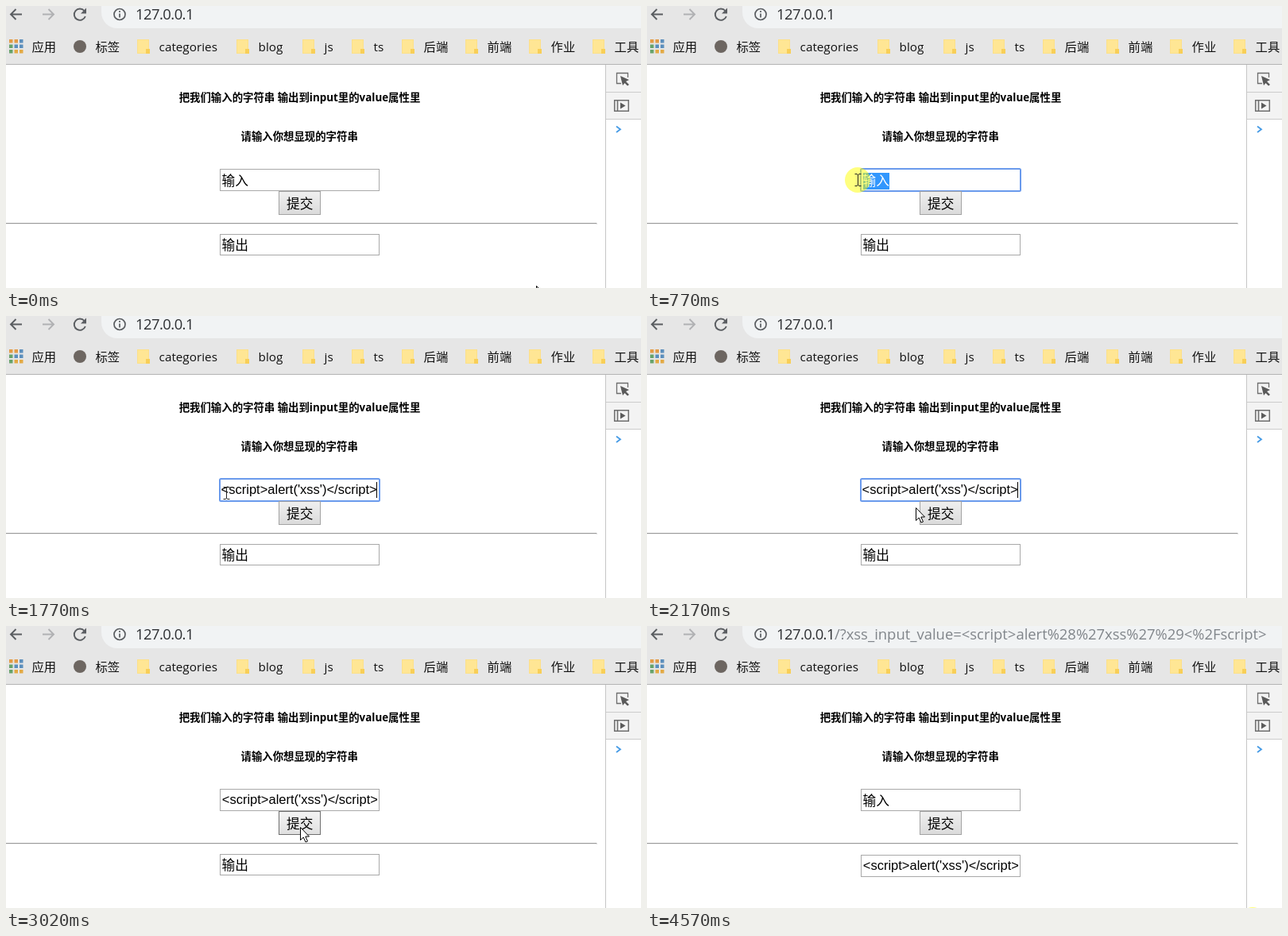
Animation of 799x355 px, one loop 4.66 s. Source, as an HTML page with a canvas:

```html
<!DOCTYPE html>
<html lang="zh-CN">
<head>
<meta charset="utf-8">
<style>
html, body { margin: 0; width: 100%; height: 100%; overflow: hidden; background: #fff; }
canvas { display: block; }
</style>
</head>
<body>
<canvas id="stage" width="799" height="355"></canvas>
<script>
const ctx = document.getElementById('stage').getContext('2d');
const LOOP = 4660, TICK = LOOP / 60;
const CJK = '"Noto Sans CJK SC", "Noto Sans CJK", sans-serif';
const UI = '"Open Sans", ' + CJK;
const FIELD = '"Liberation Sans", ' + CJK;
const PAYLOAD = "<script>alert('xss')<\/script>";
const QUERY = '/?xss_input_value=<script>alert%28%27xss%27%29<%2Fscript>';

// Pointer path: [tick, x, y]
const PATH = [
  [0, 667, 352], [7, 335, 222], [8, 318, 221], [9, 285, 220], [10, 265, 219],
  [12, 259, 220], [13, 260, 221], [21, 260, 221], [24, 286, 224], [28, 338, 241],
  [31, 379, 255], [32, 387, 255], [35, 387, 255], [39, 370, 253], [40, 373, 253],
  [47, 373, 253], [48, 373, 254], [53, 752, 351], [54, 752, 351], [55, 762, 370], [60, 762, 370]
];

const between = (v, a, b) => v >= a && v <= b;

function pointerAt(tick) {
  const i = Math.max(1, PATH.findIndex(p => p[0] >= tick));
  const [t0, x0, y0] = PATH[i - 1], [t1, x1, y1] = PATH[i];
  const k = (tick - t0) / (t1 - t0);
  return { x: Math.round(x0 + (x1 - x0) * k), y: Math.round(y0 + (y1 - y0) * k) };
}

function rect(x, y, w, h, fill) {
  ctx.fillStyle = fill;
  ctx.fillRect(x, y, w, h);
}

function frame(x, y, w, h, color) {
  ctx.strokeStyle = color;
  ctx.lineWidth = 1;
  ctx.strokeRect(x + .5, y + .5, w - 1, h - 1);
}

function text(str, x, y, size, family, color = '#000', weight = 400, spacing = 0) {
  ctx.font = `${weight} ${size}px ${family}`;
  ctx.letterSpacing = spacing + 'px';
  ctx.fillStyle = color;
  ctx.fillText(str, x, y);
  ctx.letterSpacing = '0px';
}

function line(d, color, width, x = 0, y = 0) {
  ctx.save();
  ctx.translate(x, y);
  ctx.strokeStyle = color;
  ctx.lineWidth = width;
  ctx.stroke(new Path2D(d));
  ctx.restore();
}

function shape(d, color, x = 0, y = 0) {
  ctx.save();
  ctx.translate(x, y);
  ctx.fillStyle = color;
  ctx.fill(new Path2D(d));
  ctx.restore();
}

function disc(x, y, r, color) {
  ctx.fillStyle = color;
  ctx.beginPath();
  ctx.arc(x, y, r, 0, Math.PI * 2);
  ctx.fill();
}

function folder(x) {
  rect(x, 42, 15, 18, '#ffe694');
  frame(x, 42, 15, 18, '#fde08a');
  shape('M11 12h5v6h-5z', '#f8cf58', x, 42);
}

function browserBar(submitted) {
  rect(0, 0, 799, 73, '#e6e6e6');
  shape('M799 0H120V8a20 20 0 0 0 20 20H799z', '#f1f3f4');
  rect(0, 73, 799, 1, '#b4b4b4');

  const back = 'M20 10.5H6M12.5 4L6 10.5L12.5 17';
  line(back, '#5a5d61', 1.9);
  ctx.save();
  ctx.scale(-1, 1);
  line(back, '#b0b1b3', 1.9, -66, 0);
  ctx.restore();
  line('M98.5 6A7.2 7.2 0 1 0 99.8 13', '#5a5d61', 1.9);
  shape('M101 2.5v7h-7z', '#5a5d61');

  line('M150 10.5a7 7 0 1 1-14 0a7 7 0 1 1 14 0M143 9.5v5M143 6v2', '#5a5d61', 1.7);
  text('127.0.0.1', 163, 17, 18.43, UI, '#2d2f32', 400, -.55);
  if (submitted) text(QUERY, 236, 17, 18.43, UI, '#80858a');

  const dots = ['#e39b45', '#e39b45', '#5c8fbd', '#68a36b', '#5c8fbd', '#5c8fbd', '#68a36b', '#e3aa45', '#e3aa45'];
  dots.forEach((c, i) => rect(4 + i % 3 * 6.5, 42 + Math.floor(i / 3) * 6.5, 4.5, 4.5, c));
  disc(93, 51, 8, '#6d6661');

  const label = (str, x) => text(str, x, 57, 15.3, UI, '#111');
  label('应用', 32.5);
  label('标签', 112.5);
  [['categories', 165], ['blog', 290], ['js', 373], ['ts', 435],
   ['后端', 498], ['前端', 578], ['作业', 658], ['工具', 738]].forEach(([name, x]) => {
    folder(x);
    label(name, x + 27.6);
  });
}

function devtools() {
  rect(754, 74, 45, 281, '#fff');
  rect(755, 74, 44, 68, '#f3f3f3');
  rect(754, 74, 1, 281, '#c6c6c6');
  rect(755, 108, 44, 1, '#ccc');
  rect(755, 142, 44, 1, '#ccc');
  line('M774 97.5H768.5V84.5H782.5V90', '#6e6e6e', 1.3);
  shape('M773 88L784 93L780 95L784 99L782 100.5L778.5 97L776 100z', '#5a5a5a');
  line('M765.7 118.7H783.3V132.3H765.7zM769.5 118V132', '#6e6e6e', 1.5);
  shape('M773 121.5V129.5L779.5 125.5z', '#5a5a5a');
  line('M768 151.5L773 155.2L768 159', '#469be6', 1.8);
}

function inputText(value, y, shift = 0) {
  if (value === PAYLOAD) text(value, 271.8 - shift, y + 19, 16.5, FIELD);
  else text(value, 271.5, y + 21, 16.67, CJK);
}

function clipped(y, draw) {
  ctx.save();
  ctx.beginPath();
  ctx.rect(270, y + 1, 199, 26);
  ctx.clip();
  draw();
  ctx.restore();
}

function firstInput(tick, pointer) {
  const focused = between(tick, 7, 36);
  const pasted = between(tick, 22, 39);
  frame(269, 205, 201, 28, '#a9a9a9');
  if (focused) {
    ctx.strokeStyle = '#6a9aec';
    ctx.lineWidth = 2;
    ctx.beginPath();
    ctx.roundRect(269, 205, 201, 28, 1.5);
    ctx.stroke();
  }
  clipped(205, () => {
    inputText(pasted ? PAYLOAD : '输入', 205, focused ? 1.2 : 0);
    if (!focused) return;
    if (pasted) {
      if (tick <= 28 || tick === 36) rect(466, 209, 1, 20, '#000');
      return;
    }
    const start = tick >= 10 ? 272 : pointer.x < 296 ? 288.5 : 305;
    if (start === 305) return rect(305, 209, 1, 21, '#000');
    rect(start, 210, 305 - start, 21, '#3297fd');
    ctx.beginPath();
    ctx.rect(start, 210, 305 - start, 21);
    ctx.clip();
    text('输入', 271.5, 226, 16.67, CJK, '#fff');
  });
}

function button(pointer) {
  const hover = between(pointer.x, 343, 396) && between(pointer.y, 233, 263);
  const shade = ctx.createLinearGradient(0, 233, 0, 263);
  shade.addColorStop(0, hover ? '#f4f4f4' : '#f0f0f0');
  shade.addColorStop(1, hover ? '#dfdfdf' : '#dadada');
  rect(343, 233, 53, 30, shade);
  frame(343, 233, 53, 30, hover ? '#707070' : '#a3a3a3');
  text('提交', 353, 255, 16.67, CJK);
}

function drawPointer(tick, { x, y }) {
  if (between(tick, 7, 12) || between(tick, 37, 38) || tick === 59) {
    disc(x, y, 16, 'rgba(255,255,0,.5)');
  }
  const overInput = between(x, 269, 470) && between(y, 205, 233);
  if (overInput || between(tick, 7, 12)) {
    line('M-3.5 -7.5H-1L.5 -6.5L2 -7.5H4.5M.5 -6.5V6.5M-3.5 7.5H-1L.5 6.5L2 7.5H4.5', '#222', 1, x, y);
  } else {
    const arrow = 'M.5 .5V16.5L4.2 13L7 19L9.5 18L6.8 12H11.5z';
    shape(arrow, '#fff', x, y);
    line(arrow, '#000', 1, x, y);
  }
}

function draw(tick) {
  const submitted = tick >= 40;
  const pointer = pointerAt(tick);
  rect(0, 0, 799, 355, '#fff');
  browserBar(submitted);
  text('把我们输入的字符串 输出到input里的value属性里', 217.7, 120, 13.4, UI, '#000', 700);
  text('请输入你想显现的字符串', 295.5, 169, 13.4, UI, '#000', 700);
  firstInput(tick, pointer);
  button(pointer);
  rect(0, 273, 744, 1, '#999');
  rect(0, 274, 744, 1, '#eee');
  rect(743, 273, 1, 2, '#ddd');

  const outY = submitted ? 288 : 287;
  frame(269, outY, 201, submitted ? 28 : 27, '#a9a9a9');
  clipped(outY, () => inputText(submitted ? PAYLOAD : '输出', submitted ? 288 : 286));
  devtools();
  drawPointer(tick, pointer);
}

function play() {
  // The small lead keeps each step from landing late.
  draw(Math.floor((performance.now() % LOOP + 18) / TICK) % 60);
  requestAnimationFrame(play);
}
play();
</script>
</body>
</html>
```
